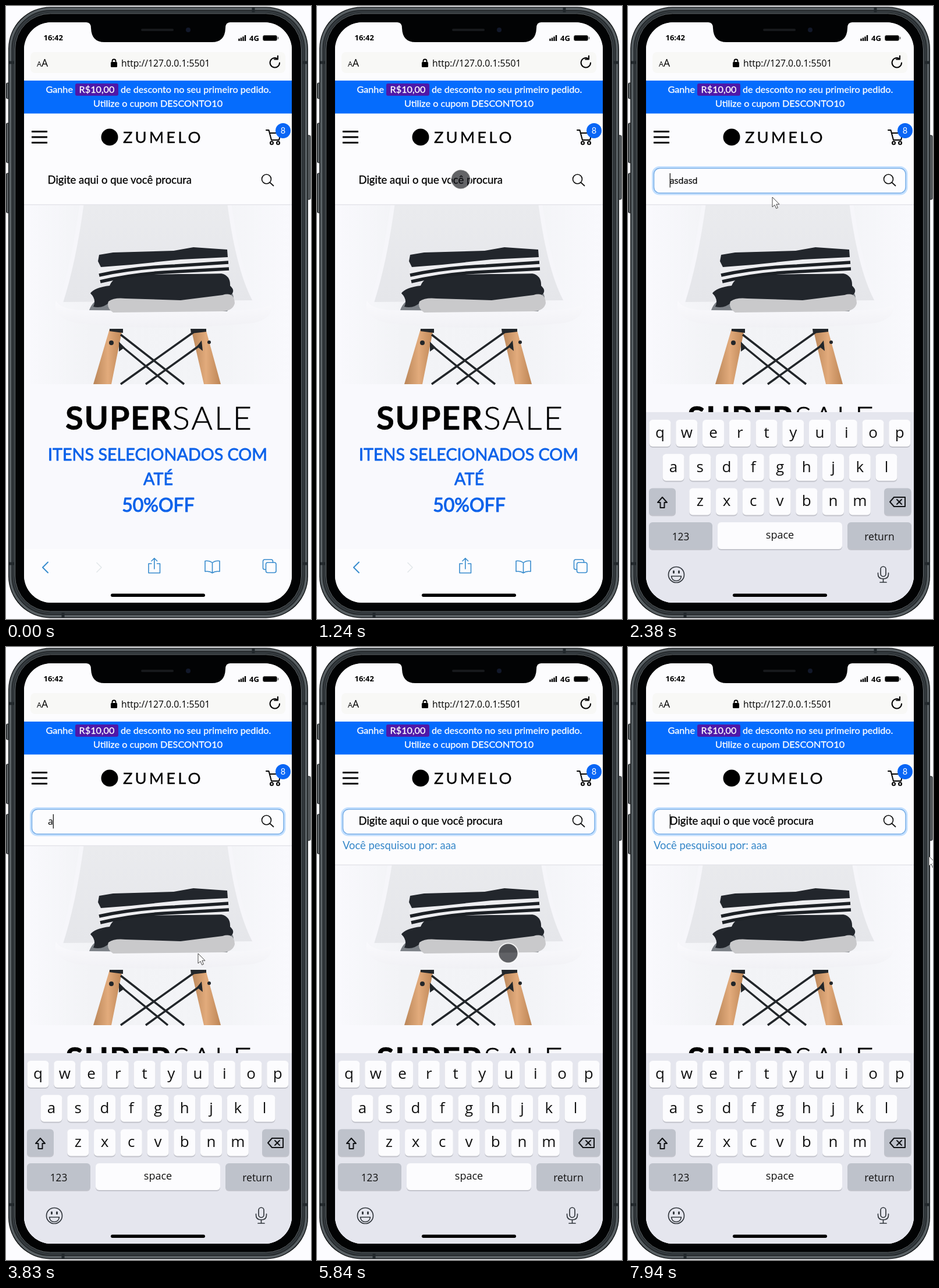
These frames come from a looping animation (524x1052 px, 8000 ms). An HTML page:

```html
<!DOCTYPE html>
<html lang="pt-BR">
<head>
<meta charset="utf-8">
<title>Busca na loja</title>
<style>
  html, body { margin: 0; width: 100%; height: 100%; overflow: hidden; background: #fcfcff; }
  svg { display: block; width: 524px; height: 1052px; }
  text { font-family: Lato, "Open Sans", sans-serif; white-space: pre; }
  .ui { font-family: "Open Sans", "Noto Sans", sans-serif; }
  .mid { text-anchor: middle; }
  .soft { stroke: currentColor; fill: currentColor; stroke-width: .3; stroke-linejoin: round; }
  .line { fill: none; stroke-linecap: round; stroke-linejoin: round; }
</style>
</head>
<body>
<svg viewBox="0 0 524 1052" xmlns="http://www.w3.org/2000/svg">
  <defs>
    <clipPath id="screen"><rect x="31" y="28" width="460" height="996" rx="47"/></clipPath>
    <linearGradient id="wall" x2="1" y2="0">
      <stop offset="0" stop-color="#f9f9fd"/><stop offset=".25" stop-color="#f2f3f6"/>
      <stop offset=".75" stop-color="#f3f4f7"/><stop offset="1" stop-color="#f9f9fd"/>
    </linearGradient>
    <linearGradient id="back" x2="0" y2="1">
      <stop offset="0" stop-color="#eaebee"/><stop offset="1" stop-color="#e5e6ea"/>
    </linearGradient>
    <linearGradient id="seat" x2="0" y2="1">
      <stop offset="0" stop-color="#fafafd"/><stop offset="1" stop-color="#f1f1f5"/>
    </linearGradient>
    <linearGradient id="wood">
      <stop offset="0" stop-color="#b98558"/><stop offset=".5" stop-color="#e2ab7c"/><stop offset="1" stop-color="#bd8555"/>
    </linearGradient>
  </defs>

  <g id="body">
    <g fill="#5a5f62" stroke="#15181a">
      <rect x=".5" y="132" width="8" height="27" rx="2"/>
      <rect x=".5" y="201" width="8" height="68" rx="2"/>
      <rect x=".5" y="287" width="8" height="68" rx="2"/>
      <rect x="515" y="222" width="8" height="110" rx="2"/>
    </g>
    <rect x="4" y="1.5" width="515" height="1049" rx="72" fill="#15181a"/>
    <rect x="7.5" y="5" width="508" height="1042" rx="69" fill="none" stroke="#596064" stroke-width="4"/>
    <rect x="12.5" y="10" width="498" height="1032" rx="64" fill="none" stroke="#33393d" stroke-width="4"/>
    <rect x="15.5" y="13" width="492" height="1026" rx="61" fill="#020304" stroke="#6d7478"/>
    <path d="M5 97h9M510 97h9M5 957h9M510 957h9M425 3v8M98 1041v8" stroke="#22282c" stroke-width="5"/>
  </g>

  <g clip-path="url(#screen)">
    <rect x="31" y="28" width="460" height="996" fill="#f9f9fd"/>

    <g id="photo">
      <rect x="31" y="341" width="460" height="308" fill="url(#wall)"/>
      <path d="M132 341H386C394 400 406 460 428 505L98 508C114 450 124 400 132 341Z" fill="url(#back)"/>
      <path d="M130 341C122 400 112 455 94 510M384 341C392 400 406 470 430 510" fill="none" stroke="#f6f6fa" stroke-width="7"/>
      <path d="M86 506Q92 520 130 522H400Q446 520 456 512Q460 536 425 544Q260 560 120 544Q78 534 86 506Z" fill="url(#seat)"/>
      <path d="M178 554H200L181 649H150Z" fill="url(#wood)"/>
      <path d="M318 554H343L369 649H340Z" fill="url(#wood)"/>
      <path d="M178 554H201V561L178 558ZM317 554H344V559L318 562ZM194 576L204 586L194 593ZM336 574L328 584L338 592Z" fill="#22262a"/>
      <path d="M197 564L306 649M322 560L197 649M200 585L278 649M332 583L240 649" stroke="#22262a" stroke-width="3.500"/>
      <g fill="#22262a"><circle cx="181" cy="578" r="4"/><circle cx="349" cy="577" r="3"/></g>
      <path d="M143 522Q150 500 182 496L378 490Q392 488 391 505L380 524Z" fill="#7d8288"/>
      <path d="M145 493Q152 483 178 480Q184 464 210 461L370 459Q386 463 385 480Q395 489 386 496L300 506L178 508Q166 520 150 516Q156 504 145 493Z" fill="#22262c"/>
      <path d="M176 507Q186 500 205 502L300 505L372 496Q392 490 393 510Q390 523 372 524L184 526Q172 518 176 507Z" fill="#c9c9cb"/>
      <path d="M158 449L300 434L380 430L383 459L215 461L160 474Z" fill="#ededf0"/>
      <path d="M160 462Q220 449 290 446L382 440M162 473Q220 459 290 456L383 451" fill="none" stroke="#1c2025" stroke-width="5.500"/>
      <path d="M160 427L184 423L288 420L322 414L380 418L381 431L300 435L215 444L163 448L158 438Z" fill="#22262c"/>
    </g>

    <g id="sale">
      <text x="102" y="727" font-size="56" font-weight="700" letter-spacing="1.700" stroke="#000" stroke-width=".6">SUPER</text>
      <text x="286" y="727" font-size="56" font-weight="300" letter-spacing="3" stroke="#000" stroke-width=".5">SALE</text>
      <g class="mid soft" color="#0b62ea">
        <text x="260.500" y="780" font-size="28.700" stroke-width=".8">ITENS SELECIONADOS COM</text>
        <text x="261.500" y="822" font-size="28.700" stroke-width=".8">ATÉ</text>
        <text x="261.500" y="868" font-size="32" stroke-width="1.100">50%OFF</text>
      </g>
    </g>

    <rect id="header" x="31" y="28" width="460" height="313" fill="#fcfcfe"/>
    <path id="headerEdge" d="M31 341H491" stroke="#e4e5ea" stroke-width="1.500"/>

    <g id="status">
      <path d="M138 28Q146 28 146 38Q147 62 169 62H354Q376 62 377 38Q377 28 385 28Z" fill="#020304"/>
      <rect x="232" y="39" width="56" height="4" rx="2" fill="#17191c"/>
      <circle cx="313" cy="41" r="4" fill="#12182a"/>
      <g font-size="13" font-weight="700">
        <text class="ui" x="64.500" y="59">16:42</text>
        <text class="ui" x="418" y="60">4G</text>
      </g>
      <path d="M400.500 60v-4M404 60v-5.500M407.500 60v-7.500M411 60v-10" stroke="#000" stroke-width="2.400"/>
      <rect x="441.500" y="50.500" width="24" height="9" rx="2.500" stroke="#555"/>
      <path d="M467.500 53v4" stroke="#555" stroke-width="1.500"/>
    </g>

    <g id="address">
      <rect x="42" y="79" width="438" height="36" rx="8" fill="#f8f8f6"/>
      <text class="ui" x="53" y="104" font-size="12.500">A</text>
      <text class="ui" x="61" y="104" font-size="17.500">A</text>
      <rect x="180" y="96" width="11" height="9" rx="1.500"/>
      <path d="M182.500 97v-2.500a3 3 0 0 1 6 0V97" fill="none" stroke="#000" stroke-width="1.800"/>
      <text class="ui" x="198" y="104" font-size="15.700">http://127.0.0.1:5501</text>
      <path class="line" d="M470 97.500a8.200 8.200 0 1 1-3-6.500M467 85.500v6h-6" stroke="#000" stroke-width="2"/>
    </g>

    <g id="coupon">
      <rect x="31" y="128" width="460" height="56.500" fill="#056cfd"/>
      <rect x="119" y="133" width="74" height="21" rx="3" fill="#4f18a8"/>
      <g class="soft" color="#fff" font-size="16.200">
        <text x="68.500" y="149">Ganhe</text>
        <text class="mid" x="156" y="149">R$10,00</text>
        <text x="197" y="149">de desconto no seu primeiro pedido.</text>
        <text class="mid" x="261" y="172.500">Utilize o cupom DESCONTO10</text>
      </g>
    </g>

    <g id="nav">
      <path d="M44 215.500H71M44 225H71M44 234.500H71" stroke="#000" stroke-width="3"/>
      <circle cx="178" cy="225" r="14.500"/>
      <text class="soft" x="201" y="235" font-size="27.500" letter-spacing="4">ZUMELO</text>
      <g class="line" stroke="#000" stroke-width="2">
        <path d="M447 213h4.500l4.500 17h13l3-12H453"/>
        <circle cx="456.500" cy="235" r="2.500"/><circle cx="467.500" cy="235" r="2.500"/>
      </g>
      <circle cx="476" cy="214" r="13" fill="#0a66f5"/>
      <text class="mid" x="476" y="219" font-size="14.500" fill="#fff">8</text>
    </g>

    <g id="ring" fill="none">
      <rect x="44" y="278" width="433.500" height="43.500" rx="10" stroke="#c4e0ff" stroke-width="6"/>
      <rect x="44.500" y="278.500" width="432.500" height="42.500" rx="10" fill="#fcfcfe" stroke="#79aee6" stroke-width="1.500"/>
    </g>
    <g class="line" stroke="#111" stroke-width="1.700">
      <circle cx="447.500" cy="297" r="8"/><path d="M453.500 303L459.500 308.500"/>
    </g>
    <text id="hint" class="soft" x="71.500" y="305" font-size="18.500">Digite aqui o que você procura</text>
    <text id="preview" class="ui" x="71.500" y="304.500" font-size="14.600" stroke="#000" stroke-width=".25">asdasd</text>
    <text id="typed" class="ui" x="72" y="305" font-size="16"></text>
    <path id="caret" d="M0 287V311.500" stroke="#000" stroke-width="1.200"/>
    <text id="result" x="44" y="347" font-size="18.400" fill="#3486c8">Você pesquisou por: aaa</text>

    <rect id="dock" x="31" y="932" width="460" height="92" fill="#fcfcfe"/>
    <g id="tools" class="line" stroke="#378bcd" stroke-width="1.600">
      <path d="M72 954.500L63 963.500L72 972.500" stroke-width="2"/>
      <path d="M156 955.500L164 963.500L156 971.500" stroke="#e2e7ea"/>
      <path d="M250 957h-5v16h19.500v-16h-5M254.800 966v-18M250 952.500l4.800-4.800 4.800 4.800"/>
      <path d="M354.500 955.500q-5-4-12.500-3v18q8-1 12.500 2.500q4.500-3.500 12.500-2.500v-18q-7.500-1-12.500 3zv17.500"/>
      <rect x="446.500" y="955" width="17.500" height="17.500" rx="3"/>
      <path d="M446 967h-2q-2.500 0-2.500-3v-11q0-3 3-3h11q3 0 3 3v2"/>
    </g>
    <g id="keyboard"></g>
    <rect x="180" y="1008.500" width="162" height="5.500" rx="2.700"/>

    <circle id="touch" r="17" fill="#14161a" fill-opacity=".66" stroke="#fff" stroke-opacity=".85" stroke-width="2"/>
  </g>

  <path id="pointer" d="M0 0V17L4 13.300L6.700 19.500L9.400 18.300L6.800 12.200H12Z" fill="#fff" stroke="#333" stroke-width=".9"/>
</svg>

<script>
const LOOP = 8000;
const el = id => document.getElementById(id);
const show = (id, on) => el(id).style.display = on ? '' : 'none';
const set = (id, attrs) => Object.entries(attrs).forEach(([k, v]) => el(id).setAttribute(k, v));
const within = (t, a, b) => t >= a && t < b;
const easeOut = p => 1 - (1 - Math.min(1, Math.max(0, p))) ** 2;

// Last value whose time has passed, from [time, value] pairs.
const stepAt = (t, steps) => steps.reduce((v, [at, next]) => t >= at ? next : v, undefined);

// Last moment in the list that has passed: the screen holds still between them.
const held = (t, moments) => moments.filter(m => m <= t).pop() ?? 0;

function buildKeyboard() {
  const key = (x, y, w, fill, label = '', size = 26, drop = 31) =>
    `<rect x="${x}" y="${y + 1.5}" width="${w}" height="46.500" rx="6" fill="#c3c4cc"/>
     <rect x="${x}" y="${y}" width="${w}" height="46" rx="6" fill="${fill}"/>
     <text class="ui mid" x="${x + w / 2}" y="${y + drop}" font-size="${size}" fill="#111">${label}</text>`;
  const light = '#fcfcfe', dark = '#bec2cb';
  const rows = [['qwertyuiop', 55], ['asdfghjkl', 78], ['zxcvbnm', 123.8]];
  let out = '<rect x="31" y="0" width="460" height="330" fill="#e5e6ee"/>';
  rows.forEach(([letters, x], r) => [...letters].forEach((c, i) =>
    out += key(x + i * 45.75 - 18.5, 13 + r * 58.7, 37, light, c)));
  out += key(36, 130.5, 46, dark) + key(440, 130.5, 46.5, dark)
    + key(36, 189, 109, dark, '123', 17.3) + key(154, 189, 214, light, 'space', 18, 28)
    + key(377, 189, 110, dark, 'return', 17.5);
  out += `<g class="line" stroke="#111316" stroke-width="2">
    <path d="M59 146l-8 9h4.500v9h7v-9h4.500z"/>
    <path d="M450 154l7-8h19v16h-19zM462 150l8 8M470 150l-8 8"/>
    <g stroke-width="1.700" stroke="#33383e">
      <circle cx="83" cy="279" r="13.500"/>
      <path d="M74.500 281.500h17q-1 8-8.500 8t-8.500-8z"/>
      <path d="M78.500 273v2.500M87.500 273v2.500" stroke-width="3"/>
      <rect x="434" y="265" width="9" height="17" rx="4.500"/>
      <path d="M429.500 276v2q0 8 9 8t9-8v-2M438.500 286v6M433 292h11"/>
    </g></g>`;
  el('keyboard').innerHTML = out;
}

function keyboardTop(t) {
  if (t < 2050) return 1060;
  const moment = held(t, [2050, 2080, 2250, 2320, 2380]);
  return 1024 - 327 * easeOut((moment - 2045) / 335);
}

// Over the page the mouse is a round touch mark; elsewhere it is an arrow.
function touchAt(t) {
  if (within(t, 500, 1090)) {
    const p = easeOut((Math.floor((t - 500) / 78) + 1) / 6);
    return [520 - 266 * p, 360 - 45 * p];
  }
  return stepAt(t, [[0, null], [1090, [247, 297.5]], [2050, null], [4390, [328.5, 525.5]], [6820, null]]);
}

const pointerAt = t => stepAt(t, [
  [0, null], [2050, [248, 328]], [3830, [330, 526]], [4390, null],
  [7560, [500, 341]], [7660, [507, 350]], [7940, [517, 359]]
]);

function render(t) {
  const submitted = t >= 4800;
  const typed = stepAt(t, [[0, ''], [3830, 'a'], [4020, 'aa'], [4240, 'aaa'], [4800, '']]);
  const headerBottom = submitted ? 374 : 341;
  set('header', { height: headerBottom - 28 });
  set('headerEdge', { d: `M31 ${headerBottom}H491` });
  show('result', submitted);

  set('ring', { opacity: stepAt(t, [[0, 0], [2250, .4], [2320, .8], [2380, 1]]) });
  show('hint', t < 2250 || submitted);
  show('preview', within(t, 2250, 3830));
  el('typed').textContent = typed;

  const caretOn = stepAt(t, [[0, false], [1750, true], [2900, false], [3480, true], [4600, false],
    [5200, true], [5840, false], [6370, true], [7150, false], [7940, true]]);
  show('caret', caretOn);
  set('caret', { transform: `translate(${72.3 + typed.length * 9} 0)` });

  show('tools', t < 1750);
  set('dock', { y: t < 1750 ? 932 : 941 });
  set('keyboard', { transform: `translate(0 ${keyboardTop(t)})` });

  const touch = touchAt(t);
  show('touch', touch);
  if (touch) set('touch', { cx: touch[0], cy: touch[1] });

  const pointer = pointerAt(t);
  show('pointer', pointer);
  if (pointer) set('pointer', { transform: `translate(${pointer})` });
}

buildKeyboard();
const start = performance.now();
function tick() {
  render((performance.now() - start) % LOOP);
  requestAnimationFrame(tick);
}
tick();
</script>
</body>
</html>
```
